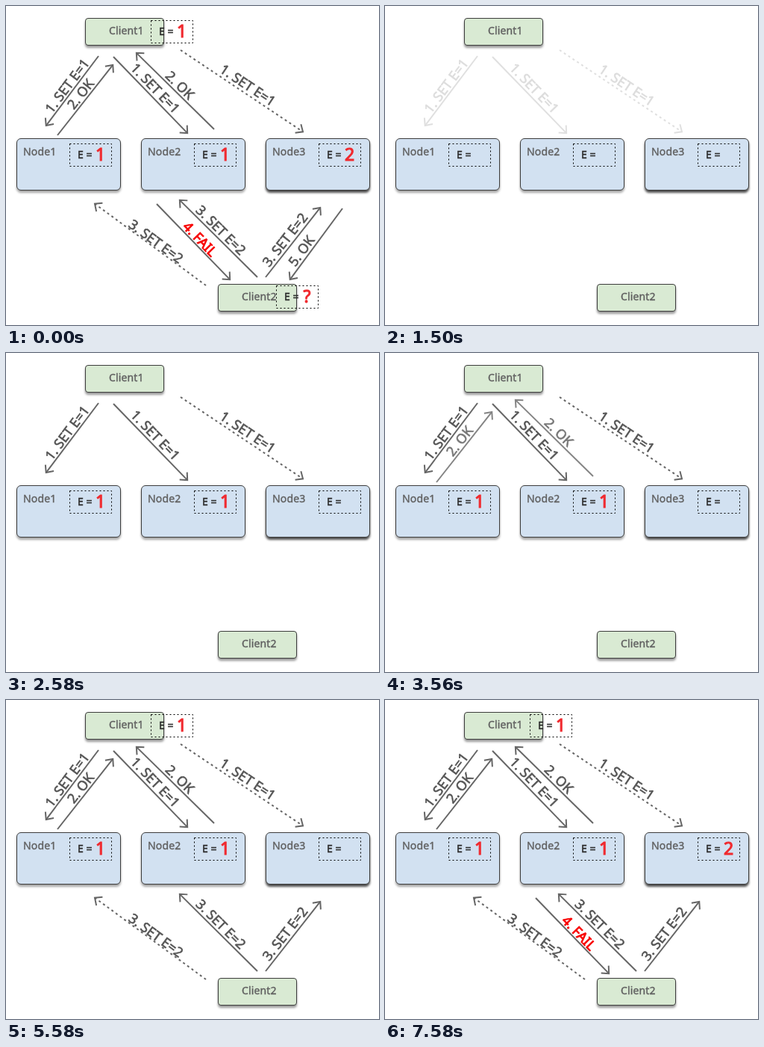
An HTML page that plays this animation: 500 px wide and 427 px high, repeating every 8 s.

```html
<!DOCTYPE html>
<html lang="en">
<head>
<meta charset="utf-8">
<title>Quorum writes</title>
<style>
  html, body { margin: 0; width: 100%; height: 100%; overflow: hidden; background: #fff; }
  svg { display: block; width: 500px; height: 427px; }
  /* A thin stroke gives the regular face a medium weight. */
  text { font-family: "Noto Sans", "Open Sans", sans-serif; fill: currentColor; stroke: currentColor; }
  .name { font-size: 14px; color: #606060; letter-spacing: .15px; stroke-width: .4; }
  .eq { font-size: 14px; color: #2b2b2b; stroke-width: .5; }
  .val { font-size: 23px; color: #f0282d; stroke-width: 1.1; text-anchor: middle; }
  .note { font-size: 18px; color: #555; stroke-width: .65; text-anchor: middle; }
  .fail { color: #f80000; stroke-width: .9; }
  .line { fill: none; stroke: #666; stroke-width: 2; }
  .slot { fill: none; stroke: #000; stroke-width: 1; stroke-dasharray: 2 3; }
</style>
</head>
<body>
<svg id="stage" viewBox="0 0 500 427" xmlns="http://www.w3.org/2000/svg"></svg>
<script>
const LOOP = 8000, STEP = 20, STEPS = 5, CLEAR = 500;
const stage = document.getElementById("stage");
const fades = [];

function add(parent, tag, attrs, text) {
  const el = document.createElementNS("http://www.w3.org/2000/svg", tag);
  for (const key in attrs) el.setAttribute(key, attrs[key]);
  if (text) el.textContent = text;
  parent.appendChild(el);
  return el;
}

// A group that is shown from `start` on and cleared early in the next loop.
function fading(parent, start) {
  const el = add(parent, "g", {});
  fades.push({ el, start });
  return el;
}

function box(x, y, w, h, r, fill, shade, label, lx, ly) {
  add(stage, "rect", {
    x: x + .5, y: y + .5, width: w, height: h, rx: r, fill, stroke: "#3c3c3c",
    style: `filter: drop-shadow(0 3px 1.5px rgba(0,0,0,${shade}))`
  });
  add(stage, "text", { class: "name", x: x + lx, y: y + ly }, label);
}

function slot(parent, x, y) {
  add(parent, "rect", { class: "slot", x: x + .5, y: y + .5, width: 56, height: 30 });
  add(parent, "text", { class: "eq", x: x + 11, y: y + 20 }, "E =");
}

function value(parent, x, y, text, start) {
  add(fading(parent, start), "text", { class: "val", x: x + 41.5, y: y + 23 }, text);
}

function arrow(start, x1, y1, x2, y2, label, cx, cy, dashed) {
  const g = fading(stage, start);
  const dir = Math.atan2(y2 - y1, x2 - x1);
  // Pulled back so that the mitred point ends at x2, y2.
  const tx = x2 - 1.2 * Math.cos(dir), ty = y2 - 1.2 * Math.sin(dir);
  const barb = turn => {
    const a = dir + Math.PI + turn;
    return `${tx + 10.5 * Math.cos(a)} ${ty + 10.5 * Math.sin(a)}`;
  };
  const shaft = add(g, "path", { class: "line", d: `M${x1} ${y1}L${tx} ${ty}` });
  if (dashed) shaft.setAttribute("stroke-dasharray", "3 4");
  add(g, "path", { class: "line", d: `M${barb(.73)}L${tx} ${ty}L${barb(-.73)}` });
  const tilt = Math.atan((y2 - y1) / (x2 - x1)) * 180 / Math.PI;
  add(g, "text", {
    class: label.includes("FAIL") ? "note fail" : "note",
    y: 6.3, transform: `translate(${cx} ${cy}) rotate(${tilt})`
  }, label);
}

const GREEN = "#d9ead3", BLUE = "#d2e1f1";
box(106, 16, 105, 36, 3.5, GREEN, .4, "Client1", 32, 22);
box(284, 372, 105, 36, 3.5, GREEN, .4, "Client2", 32, 22);
[[14, "1", 2500, .35], [181, "1", 2500, .35], [348, "2", 7500, .7]].forEach(([x, v, start, shade], i) => {
  box(x, 177, 139, 69, 5.5, BLUE, shade, "Node" + (i + 1), 9, 23);
  slot(stage, x + 71, 184);
  value(stage, x + 71, 184, v, start);
});

const SET1 = "1. SET E=1", SET2 = "3. SET E=2", OK = "2. OK";
arrow(1500, 124, 67, 53, 161, SET1, 82, 107);
arrow(1500, 144, 68, 244, 171, SET1, 200, 110);
arrow(1500, 234, 59, 399, 169, SET1, 324, 106, true);
arrow(3500, 69, 173, 144, 78, OK, 100, 118);
arrow(3500, 279, 165, 174, 62, OK, 233, 106);
arrow(5500, 268, 374, 118, 264, SET2, 201, 315, true);
arrow(5500, 337, 363, 232, 259, SET2, 288, 300);
arrow(5500, 348, 363, 422, 269, SET2, 374, 313);
arrow(6500, 202, 265, 301, 367, "4. FAIL", 260, 312);
arrow(LOOP, 451, 271, 380, 367, "5. OK", 396, 328);

// The value sits inside the fading slot, so it fades twice as deep.
[[194, 19, "1", 4500], [362, 374, "?", LOOP]].forEach(([x, y, v, start]) => {
  const g = fading(stage, start);
  slot(g, x, y);
  value(g, x, y, v, start);
});

function ramp(t, start) {
  const n = Math.floor((t - start) / STEP) + 1;
  return Math.max(0, Math.min(STEPS, n)) / STEPS;
}

function draw(t) {
  for (const { el, start } of fades) {
    el.setAttribute("opacity", 1 - ramp(t, CLEAR) + ramp(t, start));
  }
}

const origin = performance.now();
function tick() {
  draw((performance.now() - origin) % LOOP);
  requestAnimationFrame(tick);
}
draw(0);
requestAnimationFrame(tick);
</script>
</body>
</html>
```
